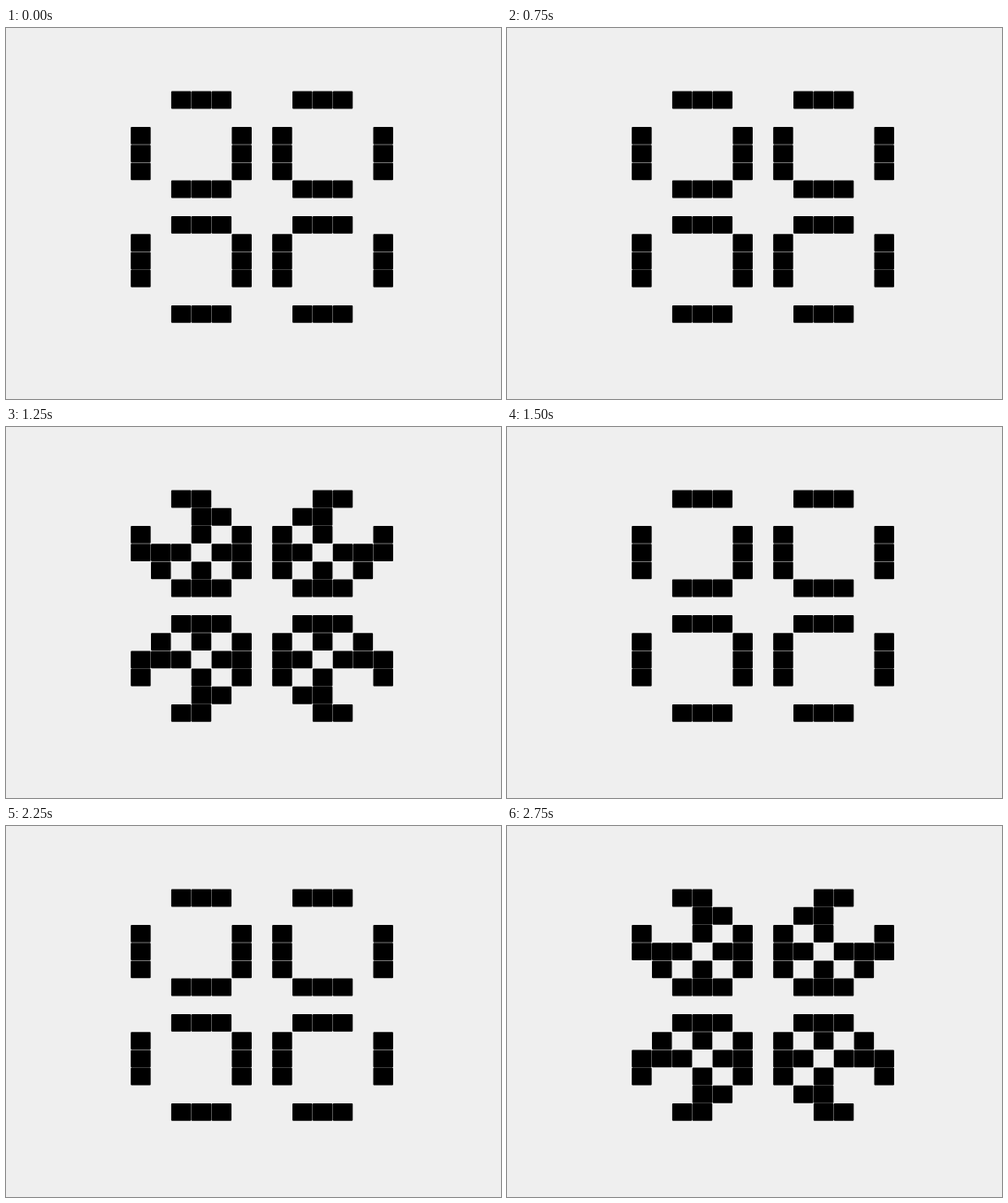
Recreate the animation shown at these times as an HTML page with a canvas. Size 560 by 420 pixels, loop 3 s.

```html
<!DOCTYPE html>
<html lang="en">
<head>
<meta charset="utf-8">
<title>Pulsar</title>
<style>
  html, body { margin: 0; width: 100%; height: 100%; overflow: hidden; background: #efefef; }
  canvas { display: block; }
</style>
</head>
<body>
<canvas id="stage" width="560" height="420"></canvas>
<script>
const ctx = document.getElementById("stage").getContext("2d");
const SIZE = 15, STEP_MS = 250;
const LEFT = 118.3, TOP = 51.4, PITCH_X = 22.86, PITCH_Y = 20.2, GAP = 0.35;

const makeGrid = rule =>
  Array.from({ length: SIZE }, (_, row) =>
    Array.from({ length: SIZE }, (_, col) => rule(row, col)));

function countNeighbours(grid, row, col) {
  let count = 0;
  for (let dy = -1; dy <= 1; dy++)
    for (let dx = -1; dx <= 1; dx++)
      if ((dx || dy) && grid[row + dy]?.[col + dx]) count++;
  return count;
}

const nextGeneration = grid => makeGrid((row, col) => {
  const count = countNeighbours(grid, row, col);
  return count === 3 || (count === 2 && grid[row][col]);
});

// The pulsar repeats after three generations.
const bars = [1, 6, 8, 13], spans = [3, 4, 5, 9, 10, 11];
const generations = [makeGrid((row, col) =>
  (bars.includes(row) && spans.includes(col)) ||
  (bars.includes(col) && spans.includes(row)))];
while (generations.length < 3) generations.push(nextGeneration(generations.at(-1)));

function draw(grid) {
  ctx.fillStyle = "#efefef";
  ctx.fillRect(0, 0, 560, 420);
  ctx.fillStyle = "#000";
  ctx.beginPath();
  grid.forEach((cells, row) => cells.forEach((alive, col) => {
    if (alive) ctx.roundRect(LEFT + col * PITCH_X, TOP + row * PITCH_Y,
      PITCH_X - GAP, PITCH_Y - GAP, 1);
  }));
  ctx.fill();
}

const start = performance.now();
function frame() {
  const step = Math.floor((performance.now() - start) / STEP_MS);
  draw(generations[step % generations.length]);
  requestAnimationFrame(frame);
}
frame();
</script>
</body>
</html>
```
